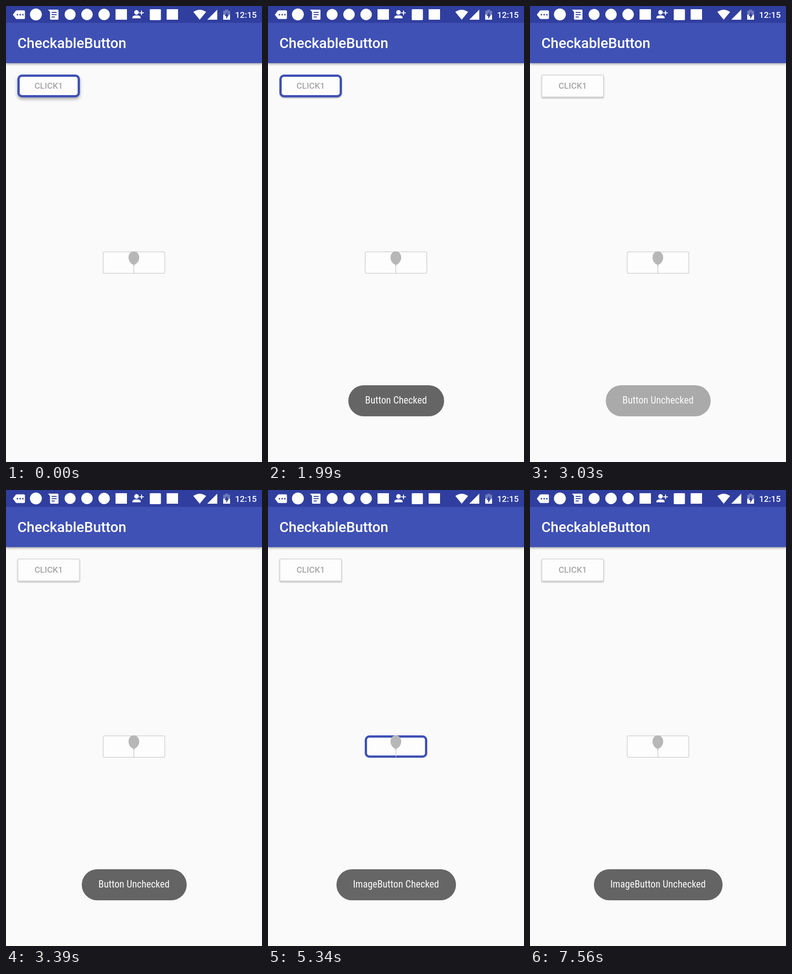
Animation, 561 px wide and 998 px high, one loop 8 s. Source, as an HTML page:

```html
<!DOCTYPE html>
<html lang="en">
<head>
<meta charset="utf-8">
<title>CheckableButton</title>
<style>
  :root {
    --loop: 8s;
    --decelerate: cubic-bezier(.333, .667, .667, 1);
    --accelerate: cubic-bezier(.333, 0, .667, .333);
    --rest: 0 2px 3px rgba(0, 0, 0, .25);
    --raised: 0 4px 7px rgba(0, 0, 0, .33);
  }
  html, body { margin: 0; width: 100%; height: 100%; overflow: hidden; }
  body { position: relative; background: #fafafa; font-family: Roboto, sans-serif; }
  body > * { position: absolute; box-sizing: border-box; white-space: nowrap; }

  .app-bar {
    left: 0; top: 0; width: 100%; height: 125px; padding-left: 25px;
    background: linear-gradient(#303f9f 37.5px, #3f51b5 37.5px);
    box-shadow: 0 2px 5px rgba(0, 0, 0, .38);
    color: #fff; font-size: 31.2px; font-weight: 500; line-height: 164px;
  }
  .status { left: 0; top: 0; width: 561px; height: 38px; fill: #fff; }
  .status text { font-size: 18.7px; font-weight: 500; }
  .status .dark { fill: #303f9f; }

  .button {
    width: 137px; height: 49.5px; background: #fdfdfd;
    border: 2px solid #dbdbdb; border-radius: 4px;
  }
  #click { left: 25px; top: 150px; animation: click-toggle var(--loop) step-end infinite, click-press var(--loop) linear infinite; }
  #image { left: 212px; top: 536.5px; animation: image-toggle var(--loop) step-end infinite; }
  .label {
    left: 25px; top: 150px; width: 137px; line-height: 50px; text-align: center;
    color: #a6a6a6; font-size: 18.7px; font-weight: 500;
  }
  .balloon { left: 266px; top: 536px; width: 28px; height: 50px; fill: #b7b7b7; }

  .toast {
    top: 829.5px; left: 280.5px; height: 68.5px; border-radius: 35px;
    transform: translateX(-50%); background: #646464; color: #fcfcfc;
    font: 400 21.8px/66px "Roboto Condensed", Roboto, sans-serif;
    font-stretch: condensed; text-align: center; opacity: 0;
    animation: var(--loop) linear infinite;
  }
  #checked { width: 210px; animation-name: checked; }
  #unchecked { width: 230px; animation-name: unchecked; }
  #image-checked { width: 262px; animation-name: image-checked; }
  #image-unchecked { width: 282px; animation-name: image-unchecked; }

  @keyframes click-toggle {
    0% { border: 5px solid #3f51b5; border-radius: 10px; }
    35.25%, 100% { border: 2px solid #dbdbdb; border-radius: 3px; }
  }
  @keyframes click-press {
    0%, .6% { box-shadow: var(--raised); }
    1.9%, 34% { box-shadow: var(--rest); }
    35.1%, 35.4% { box-shadow: var(--raised); }
    36.6%, 100% { box-shadow: var(--rest); }
  }
  @keyframes image-toggle {
    0%, 87.125% { border: 2px solid #dbdbdb; border-radius: 4px; }
    60.5% { border: 5px solid #3f51b5; border-radius: 10px; }
  }
  @keyframes checked {
    0%, .875% { opacity: 0; animation-timing-function: var(--decelerate); }
    7.375% { opacity: 1; }
    24.75% { opacity: 1; animation-timing-function: var(--accelerate); }
    32%, 100% { opacity: 0; }
  }
  @keyframes unchecked {
    0%, 35.875% { opacity: 0; animation-timing-function: var(--decelerate); }
    42.375% { opacity: 1; }
    58.875% { opacity: 1; animation-timing-function: var(--accelerate); }
    66.125%, 100% { opacity: 0; }
  }
  @keyframes image-checked {
    0%, 61.25% { opacity: 0; animation-timing-function: var(--decelerate); }
    67.875% { opacity: 1; }
    85.375% { opacity: 1; animation-timing-function: var(--accelerate); }
    92.625%, 100% { opacity: 0; }
  }
  @keyframes image-unchecked {
    0%, 88% { opacity: 0; animation-timing-function: var(--decelerate); }
    94.5%, 100% { opacity: 1; }
  }
</style>
</head>
<body>
  <div class="app-bar">CheckableButton</div>

  <svg class="status" viewBox="0 0 561 38">
    <path d="M15 19L21 11Q22 9.500 24 9.500H39Q41.500 9.500 41.500 12V26Q41.500 28.500 39 28.500H24Q22 28.500 21 27Z"/>
    <g class="dark"><circle cx="25" cy="19" r="1.700"/><circle cx="31" cy="19" r="1.700"/><circle cx="37" cy="19" r="1.700"/></g>
    <circle cx="65.500" cy="18.500" r="13"/>
    <path d="M92 8H113Q115 8 115 10V28Q115 30 113 30H98.500Q96.500 30 96.500 28V13Z"/>
    <path class="dark" d="M100 13h11v2h-11zM100 18h11v2h-11zM100 23h7v2h-7z"/>
    <circle cx="140.500" cy="18.500" r="12"/>
    <circle cx="177.500" cy="18.500" r="12.500"/>
    <circle cx="215" cy="18.500" r="12.500"/>
    <rect x="240" y="7" width="25" height="23"/>
    <circle cx="286" cy="14" r="5"/>
    <path d="M277 27V25Q277 20.500 286 20.500T295 25V27ZM296 10h2v4h4v2h-4v4h-2v-4h-4v-2h4z"/>
    <rect x="315" y="7" width="24.500" height="24" rx="2"/>
    <rect x="352" y="7" width="25" height="23"/>
    <path d="M410.500 13Q424.500 3.500 438.500 13L424.500 30ZM441 30L463 8V30Z"/>
    <path opacity=".3" d="M476 10.500h4.500v-2.500h6v2.500h4.500v8.500h-15z"/>
    <path d="M476 19h15v11h-15z"/>
    <path class="dark" d="M485 12.500L479 22h3.500v6.500L488.500 19H485Z"/>
    <text x="502" y="26">12:15</text>
  </svg>

  <div class="button" id="click"></div>
  <div class="label">CLICK1</div>

  <div class="button" id="image"></div>
  <svg class="balloon" viewBox="0 0 28 50">
    <path d="M14 1C21 1 26 7 26 14.500C26 22 20 29.500 15 30L16 32.500H12.500L13.500 30C8 29.500 2.500 22 2.500 14.500C2.500 7 7 1 14 1Z"/>
    <path d="M14.200 32Q13.600 40 14.600 49" fill="none" stroke="#c0c0c0" stroke-width="1.200"/>
  </svg>

  <div class="toast" id="checked">Button Checked</div>
  <div class="toast" id="unchecked">Button Unchecked</div>
  <div class="toast" id="image-checked">ImageButton Checked</div>
  <div class="toast" id="image-unchecked">ImageButton Unchecked</div>
</body>
</html>
```
